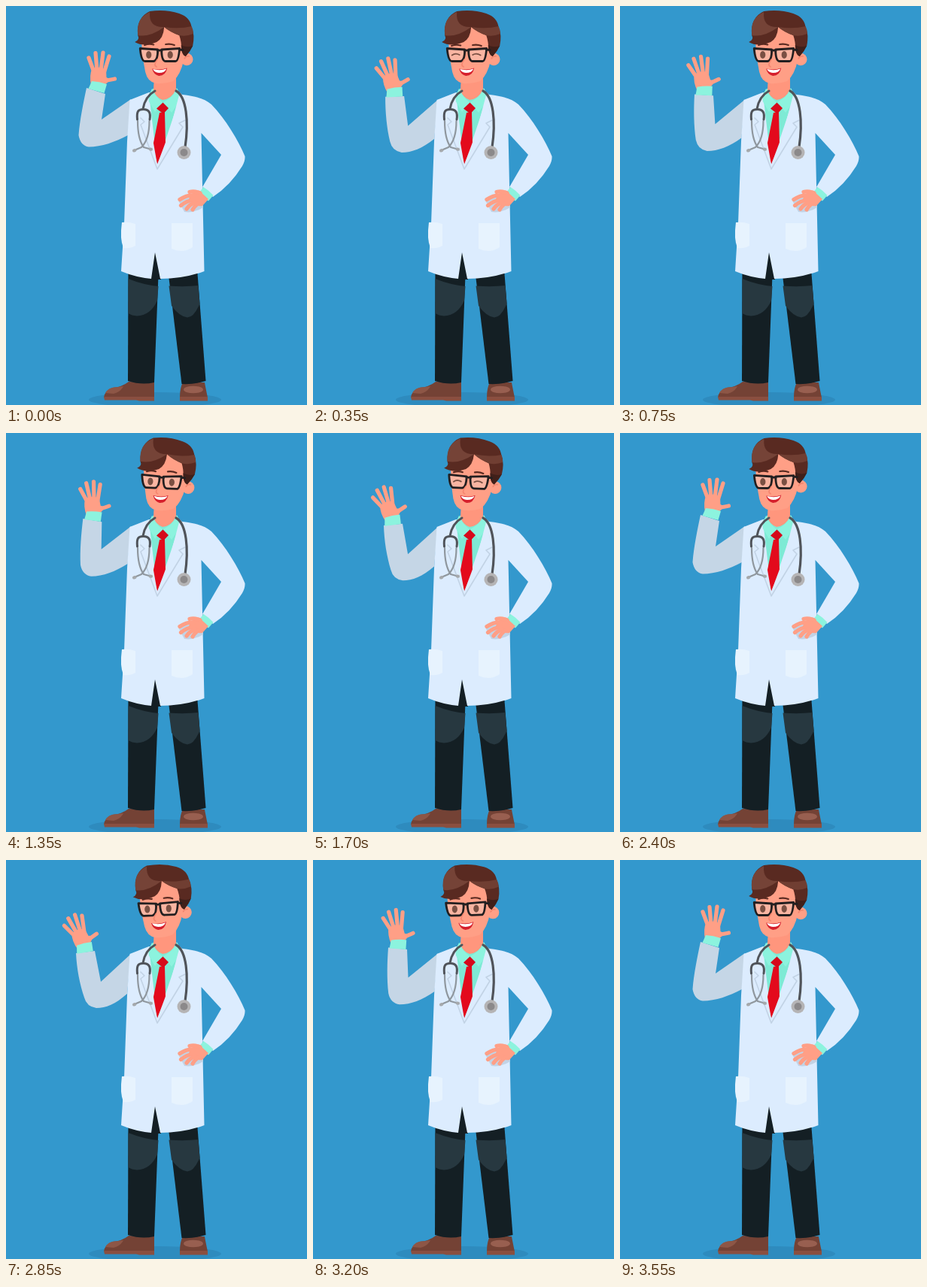
Animation, 400 px wide and 531 px high, one loop 3.6 s. Source, as an HTML page:

```html
<!DOCTYPE html>
<html lang="en">
<head>
<meta charset="utf-8">
<title>Waving doctor</title>
<style>
html, body { margin: 0; width: 100%; height: 100%; overflow: hidden; background: #3398cd; }
svg { display: block; width: 100vw; height: 100vh; }
.skin { fill: #ff9f86; }
.mint { fill: #8cf3de; }
.coat { fill: #dcecfe; }
.dark { fill: #141f24; }
.knee { fill: #273840; }
.pocket { fill: #e7f3fe; }
.line { fill: none; stroke-linecap: round; stroke-linejoin: round; }
</style>
</head>
<body>
<svg viewBox="0 0 400 531">
  <rect width="400" height="531" fill="#3398cd"/>
  <ellipse cx="198" cy="524" rx="88" ry="10" fill="#2e8bbe"/>

  <!-- shoes -->
  <path d="M130 521Q131 512 142 508Q154 507 163 500L197 501V521Z" fill="#744235"/>
  <path d="M132 515Q135 509 143 507.500Q151 507 156 506Q152 514 143 516Z" fill="#8d5646"/>
  <path d="M130 520H197V525.500H177L173 524.500H131Z" fill="#8a4f40"/>
  <path d="M231 521Q231 508 235 501H264Q266 512 268 521Z" fill="#744235"/>
  <ellipse cx="249" cy="510.500" rx="13" ry="4.800" fill="#985f50"/>
  <path d="M231 520H268V525.500H231Z" fill="#8a4f40"/>

  <!-- trousers -->
  <path class="dark" d="M162.500 345H203L197 501Q180 505 162 499Z"/>
  <path class="dark" d="M215 350H254L265.500 499Q249 504 233.500 503Z"/>
  <path class="knee" d="M162.500 363Q182 371 202.500 373L201 392Q192 412 174 412.500Q167 412 162.500 409Z"/>
  <path class="knee" d="M216.500 372.500Q238 374 255.500 372L257.500 396Q250 414 241 414.500Q230 413 220 399Z"/>
  <path class="dark" d="M191 322H206V364H191Z"/>

  <!-- waving arm -->
  <path id="sleeve" fill="#c5d6e6"/>
  <g id="hand">
    <g class="line" stroke="#ff9f86" stroke-width="5.200">
      <path d="M117 88L110 69"/>
      <path d="M121 86L119 62.500"/>
      <path d="M126 86L129 62"/>
      <path d="M130.500 88L137 67"/>
      <path d="M128 100Q134 99 144.500 97"/>
    </g>
    <path class="skin" d="M114.500 83Q124 79 133 85L133.500 95Q137 96 138 99Q134 103 130.500 105H113Q110.500 92 114.500 83Z"/>
    <path class="mint" d="M114 100Q124 100.500 134 104L130.500 116Q120 113 109.500 110Z"/>
  </g>

  <!-- coat -->
  <path class="coat" d="M164.500 125L190 115L235 118C251 120 264 123 273 131C292 151 309 179 317.500 200Q318 206 314 213Q298 239 275 254L261 241L286 198L259.500 169L263.500 353Q236 363 205 363L198 328L193 363Q172 361 153 353L157 290L161 180Z"/>
  <path class="pocket" d="M154 288Q163 287 172 290V319Q165 323 156 322Q151 310 154 288Z"/>
  <path class="pocket" d="M220 289H248V321Q235 330 220 323Z"/>

  <!-- shirt, neck and tie -->
  <path d="M190 117L201 211L232 119L224 108L195 110Z" fill="#7eead5"/>
  <path d="M197 90H226V111Q220 124 208 125Q199 122 196 112Z" fill="#ff967d"/>
  <path class="mint" d="M194 110Q198 120 208 128L198 141L188 124ZM227 109Q223 121 209 128L220 142L234 122Z"/>
  <path d="M204 142L211 141L212 184L201 211L195 187Z" fill="#e30a1c"/>
  <path d="M208.500 128.500L216 136L209 143.500L200 136.500Z" fill="#d60a1b"/>

  <!-- lapels -->
  <path class="coat" d="M189 116L181 133L180 149L176 153L201 218L201 211L192 160ZM231 115L240 124L238 151L231 153L236 160L201 218V211L217 168Z"/>
  <path class="line" d="M179 149L184 154L179 158L201 217L235 161L230 156L238 152" stroke="#c2d3e5" stroke-width="1.600"/>

  <!-- stethoscope -->
  <g class="line">
    <path d="M175 153C175 170 178 181 183 188L192 190.500M190.500 153C190.500 171 187 181 180 188L170.500 192" stroke="#8f979e" stroke-width="2.200"/>
    <path d="M198 113Q185 120 182 137M174.500 151C173.500 141 175 137.500 182.500 137.500S192.500 142 191 151" stroke="#50545a" stroke-width="3"/>
    <path d="M226 113C240 121 243 154 238 188" stroke="#50545a" stroke-width="3.200"/>
    <path d="M170 192.500L171.500 192M191.500 190.500L193 190.800" stroke="#a5a9ac" stroke-width="4"/>
  </g>
  <circle cx="236.500" cy="195" r="9" fill="#b5b4b5"/>
  <circle cx="236.500" cy="195" r="5" fill="#8b898a"/>

  <!-- hand on hip -->
  <path d="M228 257Q242 245 260 254L262 268Q250 276 237 274Z" fill="#c2d3e5"/>
  <path class="mint" d="M262.500 241Q269 245 275.500 252L269 259.500Q261 255 256 249Z"/>
  <path class="skin" d="M257 246L269 257L261 266Q253 267 248 263L242 259L246 250Z"/>
  <g class="line" stroke="#ff9f86" stroke-width="5.200">
    <path d="M258 249Q250 245.500 244 247.500"/>
    <path d="M250 252Q241 251 231 257.500"/>
    <path d="M250 258Q240 259 232.500 265.500"/>
    <path d="M252 261Q244 264 240 270"/>
    <path d="M255 263Q250 267 248 271"/>
  </g>

  <g id="head">
    <circle class="skin" cx="241" cy="71" r="8.300"/>
    <path class="skin" d="M182 42L206 26H232L236 42L237 72Q233 91 223 100Q212 104 200 103Q189 101 186 88Q182 68 181 50Z"/>
    <path d="M238 70Q240 66 244 67" class="line" stroke="#f0856d" stroke-width="1.500"/>
    <path d="M172 48Q179 45 176 39Q174 15 192 7Q213 4 231 10Q246 15 247.500 29Q252 38 249 53L245 60L239.500 67Q235 65 234 58Q234 47 231 39Q220 35 211 28Q210 43 201 48Q184 55 172 48Z" fill="#592a21"/>
    <path d="M233.500 52Q241 56 249 53L245 60L239.500 67Q235 65 234 58Z" fill="#40201a"/>
    <path d="M192 8Q173 16 176 39Q192 42 211 28Q190 29 192 8Z" fill="#754337"/>
    <path d="M211 28Q231 31 247.500 27Q250 32 249.500 37Q240 41 231 39Q219 35 211 28Z" fill="#703e32"/>
    <g id="brows" class="line" stroke="#592a21" stroke-width="2.200">
      <path d="M185 52Q191 49.800 197 51.500"/>
      <path d="M213 51Q219 49.800 224.500 52"/>
    </g>
    <path d="M180 57L202 58Q202 73 197 73.500H185Q180 73 180 57ZM208 58L231 57Q230 72 226 73.500H213Q208 73 208 58Z" fill="#f9b5a2"/>
    <g id="open" fill="#7a5043">
      <ellipse cx="190.500" cy="65" rx="3.600" ry="5"/>
      <ellipse cx="219" cy="65" rx="3.600" ry="5"/>
    </g>
    <path id="shut" class="line" d="M185.500 65.500Q190 62 195.500 65M213 65Q218 62 223.500 65.500" stroke="#7a5043" stroke-width="1.800"/>
    <path class="line" d="M179 56.500L202.500 58Q202.500 73 197 73.500H185.500Q180.500 73.500 179 56.500ZM207.500 58L231.500 56.500Q230 73.500 226 73.500H213Q207.500 73.500 207.500 58ZM202 59.500Q205 58.500 208 59.500M231 58L236 58.500" stroke="#231f20" stroke-width="2.800"/>
    <path class="line" d="M202 71Q196 79 201 81" stroke="#f58670" stroke-width="1.600"/>
    <path d="M195 83.500Q206 86 215 82.500Q213 93 204 93Q197 91.500 195 83.500Z" fill="#d51f2c"/>
    <path d="M196 84Q206 86.500 214 83.500Q212 89 204 89Q198 88.500 196 84Z" fill="#fff"/>
  </g>
</svg>
<script>
const LOOP = 3600, WAVE = 1200;
const el = id => document.getElementById(id);
const [sleeve, hand, head, brows, open, shut] =
  ["sleeve", "hand", "head", "brows", "open", "shut"].map(el);

// Sleeve outline with the arm raised inwards and swung outwards
const armIn = [107, 109, 132, 117, 127, 151, 166, 124, 162, 172,
  145, 181, 127, 187.5, 110, 187.5, 99, 186, 96.5, 172, 98, 152, 103, 128];
const armOut = [93, 124, 118, 121, 126, 162, 166, 125, 161, 178,
  145, 192, 133, 197, 120, 197, 107, 195, 104, 183, 98, 165, 94, 145];
const commands = { 0: "M", 2: "L", 4: "L", 6: "L", 8: "L", 10: "C", 16: "Q", 20: "C" };

const headKeys = [[0, 0], [750, 0], [1150, 2.5], [2200, 2.5], [2600, -2.2], [3050, -2.2], [3550, 0], [3600, 0]];
const blinks = [[300, 450], [1600, 1750]];

const mix = (a, b, p) => a + (b - a) * p;

function track(keys, t) {
  const i = keys.findIndex(k => k[0] > t);
  const [t0, a] = keys[i - 1], [t1, b] = keys[i];
  return mix(a, b, (t - t0) / (t1 - t0));
}

function swing(t) {
  const w = t % WAVE;
  return w < 450 ? w / 450 : Math.max(0, (1150 - w) / 700);
}

function draw(t) {
  const p = swing(t);
  const pts = armIn.map((v, i) => mix(v, armOut[i], p).toFixed(2));
  const path = pts.map((v, i) => (commands[i] || "") + v).join(" ");
  sleeve.setAttribute("d", `${path} ${pts[0]} ${pts[1]}Z`);
  hand.setAttribute("transform",
    `translate(${-19 * p} ${10 * p}) rotate(${-25 * p} 122 104)`);

  head.setAttribute("transform", `translate(-.8 0) rotate(${track(headKeys, t)} 205 115)`);
  const closed = blinks.some(([a, b]) => t >= a && t < b);
  open.setAttribute("visibility", closed ? "hidden" : "visible");
  shut.setAttribute("visibility", closed ? "visible" : "hidden");
  brows.setAttribute("transform", `translate(0 ${closed ? 1 : 0})`);
}

const start = performance.now();
function frame() {
  const t = (performance.now() - start) % LOOP;
  draw(Math.floor(t / 50) * 50);
  requestAnimationFrame(frame);
}
frame();
</script>
</body>
</html>
```
